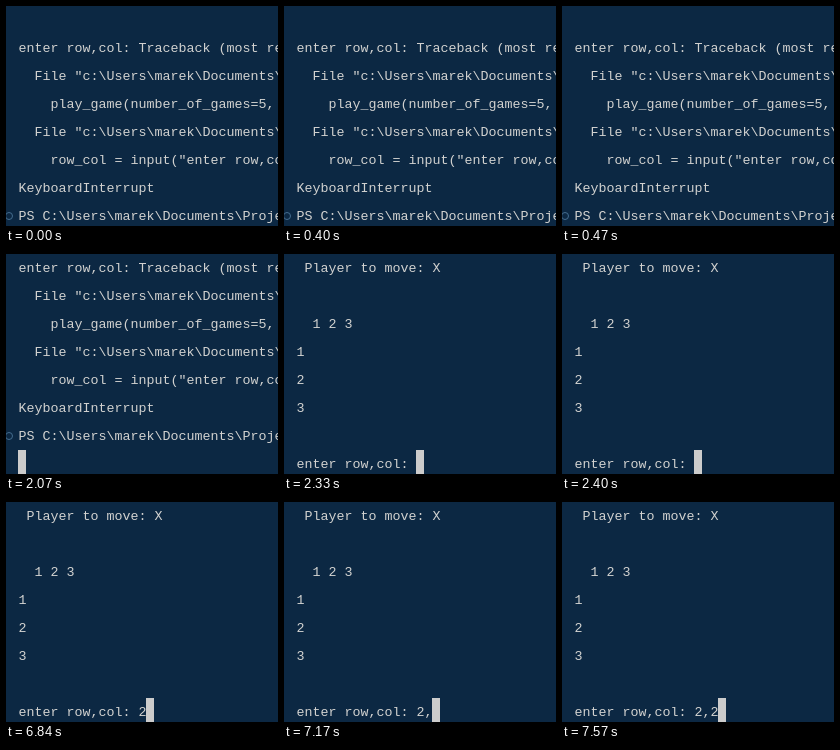
Recreate the animation shown at these times as an HTML page. Size 272 by 220 pixels, loop 8 s.

```html
<!DOCTYPE html>
<html lang="en">
<head>
<meta charset="utf-8">
<title>Terminal game</title>
<style>
html, body { margin: 0; width: 100%; height: 100%; overflow: hidden; background: #0c2843; }
#stage { position: relative; width: 272px; height: 220px; overflow: hidden; }
pre {
  position: absolute; left: 12.5px; top: 1px; margin: 0;
  font: 13.333px/28px "Liberation Mono", "Courier New", monospace;
  color: #d2d2d0;
}
#cursor { position: absolute; width: 8px; height: 28px; background: #cccccc; }
#dot {
  position: absolute; left: -1px; width: 8px; height: 8px;
  box-sizing: border-box; border: 1.3px solid #456d8f; border-radius: 50%;
}
</style>
</head>
<body>
<div id="stage">
  <pre id="text"></pre>
  <div id="dot"></div>
  <div id="cursor"></div>
</div>
<script>
const LOOP = 8000, ROW = 28, COL = 8, LEFT = 12;
const [text, dot, cursor] = ["text", "dot", "cursor"].map(id => document.getElementById(id));

const trace = [
  "",
  "enter row,col: Traceback (most recent",
  String.raw`  File "c:\Users\marek\Documents\Proj`,
  "    play_game(number_of_games=5, ",
  String.raw`  File "c:\Users\marek\Documents\Proj`,
  '    row_col = input("enter row,col: ")',
  "KeyboardInterrupt",
  String.raw`PS C:\Users\marek\Documents\Projects`
];
const board = [" Player to move: X", "", "  1 2 3", "1", "2", "3", "", "enter row,col: "];
const keyTimes = [6840, 7170, 7570];
const typed = "2,2";

function screenAt(t) {
  if (t < 2070) return trace;
  if (t < 2330) return [...trace.slice(1), ""];
  const count = keyTimes.filter(k => t >= k).length;
  return [...board.slice(0, -1), board.at(-1) + typed.slice(0, count)];
}

let shown = "";
function draw(now) {
  const t = now % LOOP;
  const lines = screenAt(t);
  const content = lines.join("\n");
  if (content !== shown) {
    shown = text.textContent = content;
    const prompt = lines.findIndex(line => line.startsWith("PS "));
    dot.hidden = prompt < 0;
    dot.style.top = prompt * ROW + 10 + "px";
    cursor.hidden = t < 2070;
    cursor.style.left = LEFT + lines.at(-1).length * COL + "px";
    cursor.style.top = (lines.length - 1) * ROW + "px";
  }
}

const start = performance.now();
function tick() {
  draw(performance.now() - start);
  requestAnimationFrame(tick);
}
tick();
</script>
</body>
</html>
```
